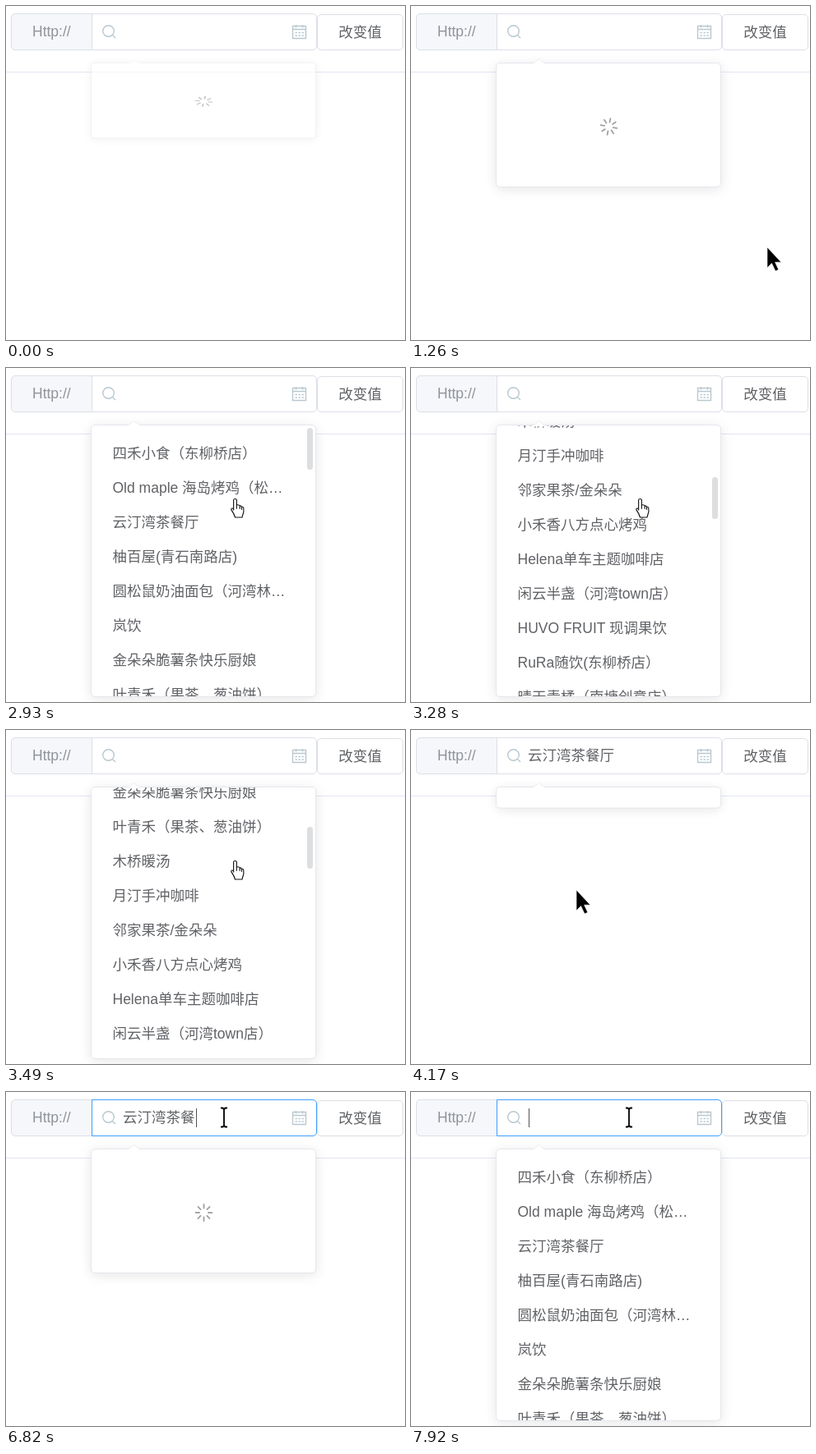
An HTML page for the animation above (7.99 s loop, 485x407 px).

```html
<!DOCTYPE html>
<html lang="zh">
<head>
<meta charset="utf-8">
<style>
html, body { margin: 0; width: 100%; height: 100%; overflow: hidden; background: #fff; }
body { position: relative; font: 17.5px "Liberation Sans", "Noto Sans CJK SC", "Noto Sans CJK", sans-serif; color: #606266; }
div, svg { position: absolute; box-sizing: border-box; white-space: pre; }
.box { border: 1px solid #dcdfe6; line-height: 42px; }
#rule { left: 0; top: 80px; width: 100%; height: 1px; background: #e1e6f1; }
#prefix { left: 6px; top: 9px; width: 99px; height: 45px; padding-left: 25px; border-radius: 5px 0 0 5px; background: #f5f7fa; color: #909399; }
#input { left: 104px; top: 9px; width: 274px; height: 45px; padding-left: 37px; line-height: 43px; border-radius: 0 5px 5px 0; }
#button { left: 378px; top: 10px; width: 105px; height: 44px; border-radius: 5px; text-align: center; }
#caret { top: 20px; width: 1px; height: 23px; background: #505256; }
#pop { left: 103px; top: 69px; width: 274px; background: #fff; border: 1px solid #e4e7ed; border-radius: 5px; box-shadow: 0 2.5px 15px rgba(0,0,0,.1); transform-origin: center top; }
#view { inset: 0; overflow: hidden; border-radius: 4px; }
ul { list-style: none; margin: 0; padding: 13px 0; }
li { height: 42px; line-height: 42px; padding-left: 25.5px; white-space: pre; }
li.hover { background: #f5f7fa; }
.one li:not(:nth-child(3)) { display: none; }
#thumb { left: 262px; width: 7px; height: 51px; border-radius: 4px; background: #dddee0; }
svg { left: 0; top: 0; overflow: visible; fill: none; }
</style>
</head>
<body>
<div id="rule"></div>
<div id="prefix" class="box">Http://</div>
<div id="input" class="box"></div>
<div id="button" class="box">改变值</div>
<div id="caret"></div>
<svg width="485" height="60" stroke="#b9c8cf" stroke-width="1.4">
  <circle cx="124.5" cy="30.5" r="6.8"/>
  <path d="M129.500 35.500L133 39M348.500 24.500H364.500V39.500H348.500ZM348.500 28.500H364.500M352.500 23V26.500M360.500 23V26.500"/>
  <path d="M351.500 32.500H362M351.500 36H362" stroke-dasharray="2.4 1.6"/>
</svg>
<div id="pop">
  <div id="view"><ul id="list"></ul></div>
  <div id="thumb"></div>
  <svg width="1" height="1">
    <path d="M44.500 .3L51.500 -5.500 58.500 .3" fill="#fff" stroke="#ebeef5"/>
    <path d="M44.500 .5H58.500" stroke="#fff" stroke-width="1.6"/>
    <g id="spin" stroke="#a0a0a0" stroke-width="1.8" stroke-linecap="round"></g>
  </svg>
</div>
<svg id="cursor" width="1" height="1">
  <path id="arrow" d="M0 0V25L5.500 19.500 10 29 13.800 27.300 9.600 18.200H17Z" fill="#000" stroke="#fff" stroke-width=".6"/>
  <path id="hand" transform="translate(-.5 .5) scale(.94)" d="M-2 15V1.500Q-2 0 0 0T2 1.500V8Q5 7 6 9Q8 8.500 8.500 10.500Q11 10 11 13V17Q10 20 9 24H0Q-1 20 -5 14Q-5 11 -2 13M2 8V13M6 9V13M8.500 10.500V14" fill="#fff" stroke="#111" stroke-width="1.2"/>
  <path id="beam" d="M0 -10V10M-4 -11.500H-1.500L0 -10 1.500 -11.500H4M-4 11.500H-1.500L0 10 1.500 11.500H4" stroke="#000" stroke-width="1.8"/>
</svg>
<script>
const LOOP = 7990;
const shops = [
  '四禾小食（东柳桥店）', 'Old maple 海岛烤鸡（松…', '云汀湾茶餐厅', '柚百屋(青石南路店)',
  '圆松鼠奶油面包（河湾林…', '岚饮', '金朵朵脆薯条快乐厨娘', '叶青禾（果茶、葱油饼）',
  '木桥暖汤', '月汀手冲咖啡', '邻家果茶/金朵朵', '小禾香八方点心烤鸡', 'Helena单车主题咖啡店',
  '闲云半盏（河湾town店）', 'HUVO FRUIT 现调果饮', 'RuRa随饮(东柳桥店）', '晴天青橘（南塘创意店）'
];
const heights = { loading: 152, full: 332, one: 69, empty: 27, none: 0 };
const phases = [
  [-50, 'loading'], [2110, 'full'], [4170, 'empty'], [4470, 'none'], [5000, 'loading'],
  [6340, 'one'], [6820, 'loading'], [7240, 'one'], [7440, 'loading'], [7920, 'full']
];
const pointer = [
  [910, 470, 398], [1050, 460, 352], [1260, 433, 294], [1650, 417, 273], [2510, 417, 273],
  [2860, 279, 159], [3720, 279, 159], [3900, 203, 188], [4100, 203, 188], [4170, 201, 195], [4640, 265, 31]
];
const scrolls = [[2930, 0], [3270, 375], [3350, 375], [3780, 0]];
const deletions = [6540, 6890, 6960, 7030, 7100, 7170];

const $ = id => document.getElementById(id);
const show = (id, on) => $(id).style.display = on ? '' : 'none';
const clamp = v => Math.min(1, Math.max(0, v));
const easeOut = v => 1 - (1 - clamp(v)) ** 5;
const smooth = v => v * v * (3 - 2 * v);

// Values of the track at time t, eased between neighbouring keys
function along(track, t) {
  const i = track.findIndex(k => k[0] > t);
  if (i < 1) return track[i ? track.length - 1 : 0].slice(1);
  const [a, b] = [track[i - 1], track[i]];
  const p = smooth((t - a[0]) / (b[0] - a[0]));
  return a.slice(1).map((v, n) => v + (b[n + 1] - v) * p);
}

$('list').innerHTML = shops.map(s => `<li>${s}</li>`).join('');
const rows = [...$('list').children];
$('spin').innerHTML = [...Array(8).keys()].map(i => `<path d="M5.500 0H10" transform="rotate(${i * 45})"/>`).join('');

function drawInput(t) {
  const left = t < 4170 ? 0 : shops[2].length - deletions.filter(d => t >= d).length;
  const focus = clamp((t - 4730) / 200);
  const mix = (a, b) => a + (b - a) * focus;
  $('input').textContent = shops[2].slice(0, left);
  $('input').style.borderColor = `rgb(${mix(220, 64)},${mix(223, 158)},${mix(230, 255)})`;
  $('caret').style.left = 143 + 17.5 * left + 'px';
  const typing = t >= 6540 && t < 7440;
  show('caret', t >= 4730 && (typing || (t - 480) % 1060 < 530));
}

function drawPopup(t, hand, y) {
  const [start, kind] = phases.filter(p => t >= p[0]).pop();
  const age = t - start;
  const p = kind == 'empty' ? 1 - easeOut(age / 300)
    : start == -50 || start == 5000 ? easeOut(age / 300) : 1;
  const pop = $('pop').style;
  show('pop', kind != 'none');
  pop.height = heights[kind] + 'px';
  pop.opacity = p;
  pop.transform = `scaleY(${p})`;

  const scroll = along(scrolls, t)[0];
  const full = kind == 'full';
  show('list', full || kind == 'one');
  $('list').className = kind;
  $('list').style.transform = full ? `translateY(${-scroll}px)` : '';
  const over = full && hand ? Math.floor((y - 83 + scroll) / 42) : -1;
  rows.forEach((r, i) => r.className = i == over && !scroll ? 'hover' : '');
  show('thumb', full && hand);
  $('thumb').style.top = 3 + scroll * 0.16 + 'px';
  show('spin', kind == 'loading');
  $('spin').setAttribute('transform', `translate(136.5 77) rotate(${age * 0.18})`);
}

function draw(t) {
  const [x, y] = along(pointer, t);
  const hand = t < 4170 && x < 377 && y > 69;
  const beam = y < 54;
  show('cursor', t >= 910);
  show('hand', hand);
  show('beam', beam);
  show('arrow', !hand && !beam);
  $('cursor').style.transform = `translate(${x}px,${y}px)`;
  drawInput(t);
  drawPopup(t, hand, y);
}

const origin = performance.now();
function tick() {
  draw((performance.now() - origin) % LOOP);
  requestAnimationFrame(tick);
}
tick();
</script>
</body>
</html>
```
